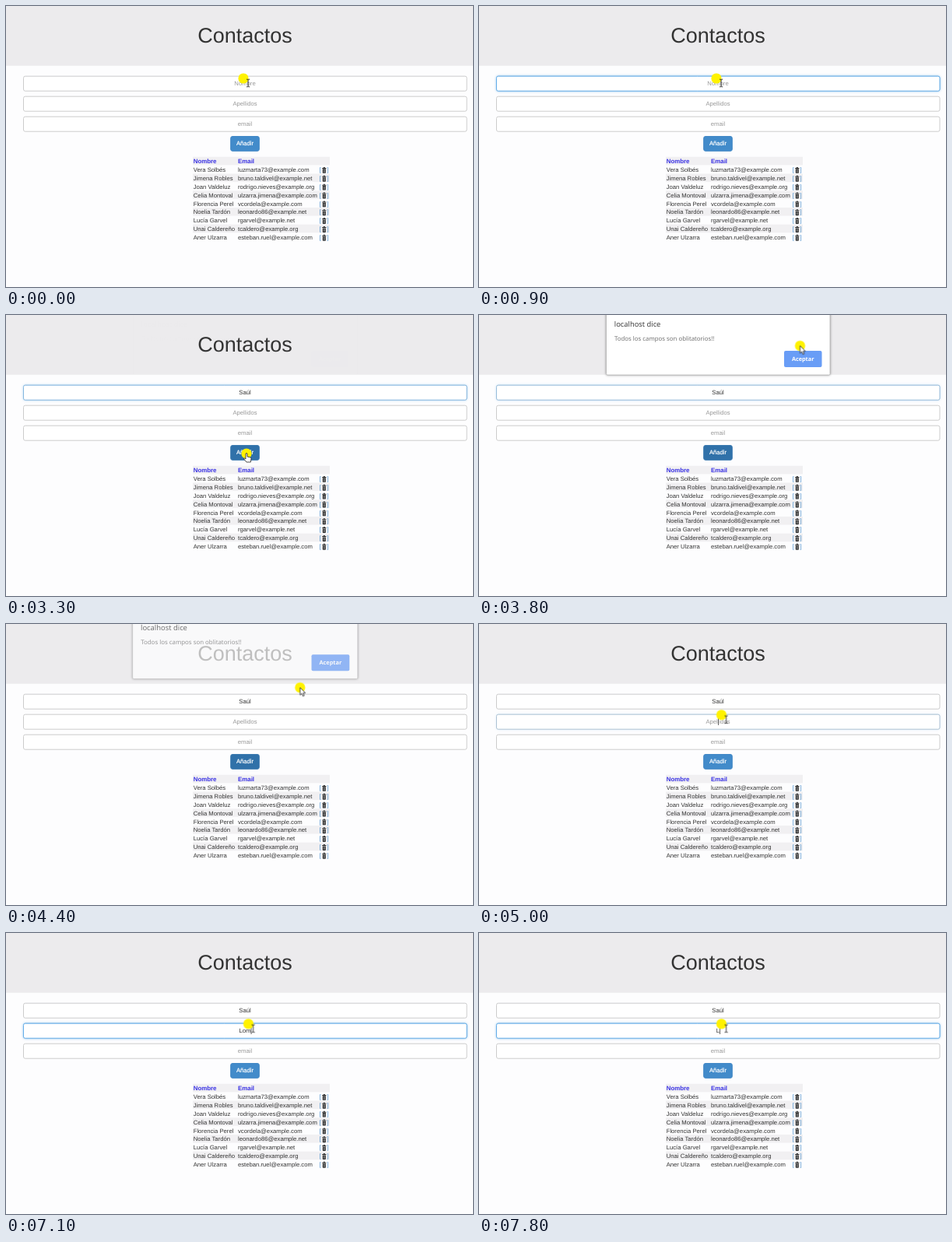
Animation, 600 px wide and 361 px high, one loop 8 s. Source, as an HTML page:

```html
<!DOCTYPE html>
<html lang="es">
<head>
<meta charset="utf-8">
<title>Contactos</title>
<style>
html, body { margin: 0; width: 100%; height: 100%; overflow: hidden; background: #fdfdfe; }
svg { display: block; width: 600px; height: 361px; }
text { font: 7.7px "Liberation Sans", Arial, sans-serif; fill: #333; text-rendering: geometricPrecision; white-space: pre; }
.mid { text-anchor: middle; }
.title { font-size: 27px; }
.th { font-size: 7.9px; font-weight: bold; fill: #3a32e4; }
.link { fill: #428bca; }
.hint { fill: #999; }
.box { fill: #fff; stroke: #ccc; }
.glow { fill: #fff; stroke: #66afe9; filter: drop-shadow(0 0 1.6px rgba(102,175,233,.7)); opacity: 0; }
.caption { fill: #fff; stroke: #fff; stroke-width: .2; }

.glow, #add, #dialog, #pointer, #pointer g { animation: 8s linear infinite; }
#glow0 { animation-name: glow0; }
#glow1 { animation-name: glow1; }
#add { fill: #428bca; stroke: #4187c5; animation-name: press; animation-timing-function: step-end; }
#dialog { opacity: 0; transform-origin: 307px 0; animation-name: dialog; }
#pointer { animation-name: move; animation-timing-function: ease-in-out; }
#pointer g { animation-timing-function: step-end; }
#pointer #beam { animation-name: beam; }
#pointer #hand { animation-name: hand; }
#pointer #arrow { animation-name: arrow; }

#panel { fill: #fff; stroke: #b4b4b4; stroke-width: .8; filter: drop-shadow(0 .8px 1.5px rgba(0,0,0,.4)); }
#dialog text { font-family: "Open Sans", "Noto Sans", sans-serif; }
#dialog .head { font-size: 9.4px; }
#dialog .note { font-size: 7.85px; fill: #6a6a6a; }
#dialog .ok { font-size: 7.3px; font-weight: 700; fill: #fff; }

@keyframes glow0 {
  0%, 1.25% { opacity: 0; }
  4%, 40% { opacity: 1; }
  42%, 53.75% { opacity: .5; }
  55%, 100% { opacity: 0; }
}
@keyframes glow1 {
  0%, 62% { opacity: 0; }
  63.75%, 100% { opacity: 1; }
}
@keyframes press {
  0%, 62% { fill: #428bca; stroke: #4187c5; }
  37.5% { fill: #3071a9; stroke: #3a79b0; }
}
@keyframes dialog {
  0%, 41.25% { opacity: 0; transform: none; }
  42.5%, 53.1% { opacity: 1; transform: none; }
  55% { opacity: .7; transform: translateY(-7px) scale(1.006); }
  56.25%, 100% { opacity: 0; transform: translateY(-12px) scale(1.01); }
}
@keyframes move {
  0%, 32.5% { transform: translate(305px, 93px); }
  33.75% { transform: translate(307px, 93px); }
  38.75%, 42.5% { transform: translate(309px, 178px); }
  46.9% { transform: translate(412.5px, 39.5px); }
  53.1% { transform: translate(412.5px, 39.5px); animation-timing-function: linear; }
  55% { transform: translate(378px, 81.5px); animation-timing-function: ease-out; }
  61.5%, 100% { transform: translate(311.5px, 116.7px); }
}
@keyframes beam {
  0%, 56.25% { visibility: visible; }
  37.5% { visibility: hidden; }
}
@keyframes hand {
  0%, 43.75% { visibility: hidden; }
  37.5% { visibility: visible; }
}
@keyframes arrow {
  0%, 56.25% { visibility: hidden; }
  43.75% { visibility: visible; }
}
</style>
</head>
<body>
<svg viewBox="0 0 600 361">
  <defs>
    <g id="trash" fill="#333">
      <path d="M0 1.6h1.6V.6h2v1h1.6v1H0z"/>
      <path d="M.5 3h4.2v4.6q0 .9-.9.9H1.4q-.9 0-.9-.9z"/>
      <path d="M1.9 4v3.5M3.4 4v3.5" stroke="#aaa" stroke-width=".6"/>
    </g>
  </defs>
  <rect width="600" height="76.7" fill="#ecebed"/>
  <text class="title mid" x="307" y="46.9">Contactos</text>
  <g id="form"></g>
  <rect id="add" x="288.7" y="167.5" width="36.6" height="18.8" rx="2.2"/>
  <text class="caption mid" x="307" y="179.2">Añadir</text>
  <g id="table"></g>
  <g id="dialog">
    <rect id="panel" x="163.5" y="-20" width="287.5" height="97" rx="1.5"/>
    <text class="head" x="173.8" y="15.3">localhost dice</text>
    <text class="note" x="174" y="33">Todos los campos son oblitatorios!!</text>
    <rect x="392" y="46" width="48.5" height="21" rx="2" fill="#699df6"/>
    <text class="ok mid" x="416.2" y="59.2">Aceptar</text>
  </g>
  <g id="pointer">
    <circle r="6.6" fill="#fff200"/>
    <g id="beam"><path d="M4 1.2h1.6l.5.5.5-.5h1.6M6.1 1.5v9M4 10.8h1.6l.5-.5.5.5h1.6" fill="none" stroke="#222" stroke-width=".9"/></g>
    <g id="hand"><path d="M-1 0q1-1 2 0v4l4 .9q1 .4 1 1.5l-.6 4.6h-5.4L-3.4 7q0-1.4 1-1l1.4 1z" fill="#fff" stroke="#222" stroke-width=".8"/></g>
    <g id="arrow"><path d="M0 0v9.6l2.2-2 1.5 3.5 1.7-.7-1.5-3.4h3z" fill="#fff" stroke="#222" stroke-width=".8"/></g>
  </g>
</svg>
<script>
const LOOP = 8000, BLINK = 530, MID = 307;
const byId = id => document.getElementById(id);

function add(parent, tag, attrs, text = '') {
  const el = document.createElementNS('http://www.w3.org/2000/svg', tag);
  for (const key in attrs) el.setAttribute(key, attrs[key]);
  el.textContent = text;
  return parent.appendChild(el);
}

// Form
const hints = ['Nombre', 'Apellidos', 'email'];
const form = byId('form');
const fields = hints.map((hint, i) => {
  const y = 90 + 26 * i;
  const frame = { x: 22.5, y: y + .2, width: 569.5, height: 19, rx: 2.2 };
  add(form, 'rect', { ...frame, class: 'box' });
  if (i < 2) add(form, 'rect', { ...frame, class: 'glow', id: 'glow' + i });
  return add(form, 'text', { x: MID, y: y + 12, class: 'mid hint' }, hint);
});
const caret = add(form, 'rect', { width: .7, height: 9, fill: '#222' });

// Contact list
const contacts = [
  ['Vera Solbés', 'luzmarta73@example.com'],
  ['Jimena Robles', 'bruno.taldivel@example.net'],
  ['Joan Valdeluz', 'rodrigo.nieves@example.org'],
  ['Celia Montoval', 'ulzarra.jimena@example.com'],
  ['Florencia Perel', 'vcordela@example.com'],
  ['Noelia Tardón', 'leonardo86@example.net'],
  ['Lucía Garvel', 'rgarvel@example.net'],
  ['Unai Caldereño', 'tcaldero@example.org'],
  ['Aner Ulzarra', 'esteban.ruel@example.com']
];
const table = byId('table');
[['Nombre', 'Email'], ...contacts].forEach(([name, mail], i) => {
  const y = 193.8 + 10.86 * i, base = y + 8.5, cls = i ? '' : 'th';
  if (i % 2 === 0) add(table, 'rect', { x: 240, y, width: 176, height: 10.6, fill: '#f1f0f2' });
  add(table, 'text', { x: 240.7, y: base, class: cls }, name);
  add(table, 'text', { x: 298, y: base, class: cls }, mail);
  if (!i) return;
  add(table, 'text', { x: 402.5, y: base, class: 'link' }, '[');
  add(table, 'text', { x: 412.6, y: base, class: 'link' }, ']');
  add(table, 'use', { href: '#trash', x: 406.2, y: y + 1.7 });
});

// Typing: [time, focused field, its value]
const typing = [
  [100, 0, ''], [1280, 0, 'S'], [1380, 0, 'Sa'], [1580, 0, 'Saú'], [1880, 0, 'Saúl'],
  [3200, -1, ''],
  [4970, 1, ''], [5870, 1, 'L'], [6280, 1, 'Lo'], [6380, 1, 'Lom'], [6580, 1, 'Lomi'],
  [7080, 1, 'Lom'], [7380, 1, 'Lo'], [7580, 1, 'L']
];

function draw(now) {
  const t = now % LOOP;
  const values = ['', '', ''];
  let last = 0, focus = -1;
  for (const [time, field, value] of typing) {
    if (time > t) break;
    last = time;
    focus = field;
    if (field >= 0) values[field] = value;
  }
  fields.forEach((el, i) => {
    const text = values[i] || hints[i];
    if (el.textContent !== text) el.textContent = text;
    el.classList.toggle('hint', !values[i]);
  });
  const on = focus >= 0 && (t - last) % (2 * BLINK) < BLINK;
  caret.style.visibility = on ? 'visible' : 'hidden';
  if (on) {
    const width = values[focus] ? fields[focus].getComputedTextLength() : 0;
    caret.setAttribute('x', MID + width / 2 + .2);
    caret.setAttribute('y', 95 + 26 * focus);
  }
  requestAnimationFrame(draw);
}
requestAnimationFrame(draw);
</script>
</body>
</html>
```
